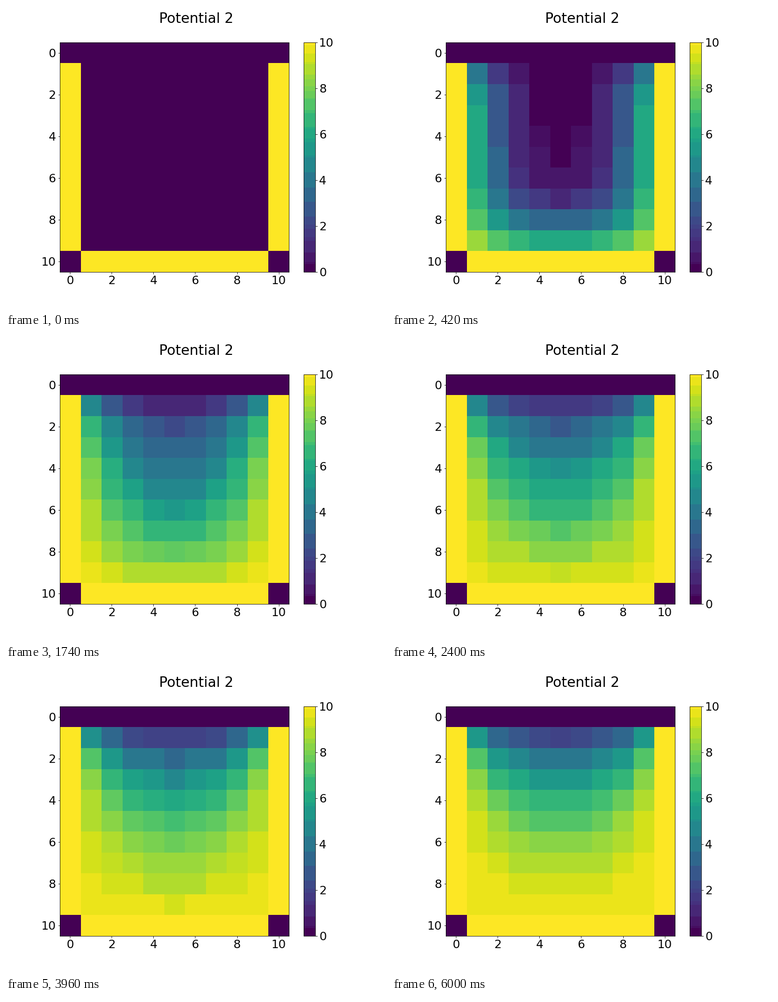
Recreate the animation shown at these times as a matplotlib script. Size 720 by 576 pixels, loop 6180 ms.

```python
import numpy as np
import matplotlib.pyplot as plt
from matplotlib.animation import FuncAnimation
from matplotlib.colors import ListedColormap

W, H, DPI = 720, 576, 72
FRAMES, INTERVAL = 103, 60
N, V = 11, 10

plt.rcParams.update({"font.family": "DejaVu Sans", "font.size": 22})


def banded_viridis():
    """Viridis reduced to 3/4/3 bits per channel, each band in its mean colour."""
    lut = (plt.get_cmap("viridis")(np.arange(256))[:, :3] * 255).astype(int)
    r, g, b = lut.T
    key = (r >> 5) * 256 + (g >> 4) * 8 + (b >> 5)
    out = np.empty((256, 3))
    for k in np.unique(key):
        band = key == k
        out[band] = lut[band].mean(axis=0).astype(int)
    # the end bands keep the plain end colours
    for end in (0, 255):
        out[key == key[end]] = lut[end]
    return ListedColormap(out / 255)


def relax(steps):
    """Jacobi relaxation of a box with three sides held at V."""
    u = np.zeros((N, N))
    u[1:-1, 0] = u[1:-1, -1] = u[-1, 1:-1] = V
    states = [u]
    for _ in range(steps - 1):
        nxt = u.copy()
        nxt[1:-1, 1:-1] = (u[:-2, 1:-1] + u[2:, 1:-1]
                           + u[1:-1, :-2] + u[1:-1, 2:]) / 4
        u = nxt
        states.append(u)
    return states


states = relax(FRAMES)
ticks = range(0, N, 2)

fig = plt.figure(figsize=(W / DPI, H / DPI), dpi=DPI)
fig.suptitle("Potential 2")

side = 0.755 * H
ax = fig.add_axes([(536.4 - side) / W, 0.125, side / W, 0.755])
cax = fig.add_axes([564.3 / W, 0.125, side / 20 / W, 0.755])

img = ax.imshow(states[0], cmap=banded_viridis(), vmin=0, vmax=V)
ax.set_xticks(ticks)
ax.set_yticks(ticks)
fig.colorbar(img, cax=cax, ticks=ticks)


def draw(i):
    img.set_data(states[i])
    return [img]


anim = FuncAnimation(fig, draw, frames=FRAMES, interval=INTERVAL,
                     repeat=True, repeat_delay=0)
plt.show()
```
